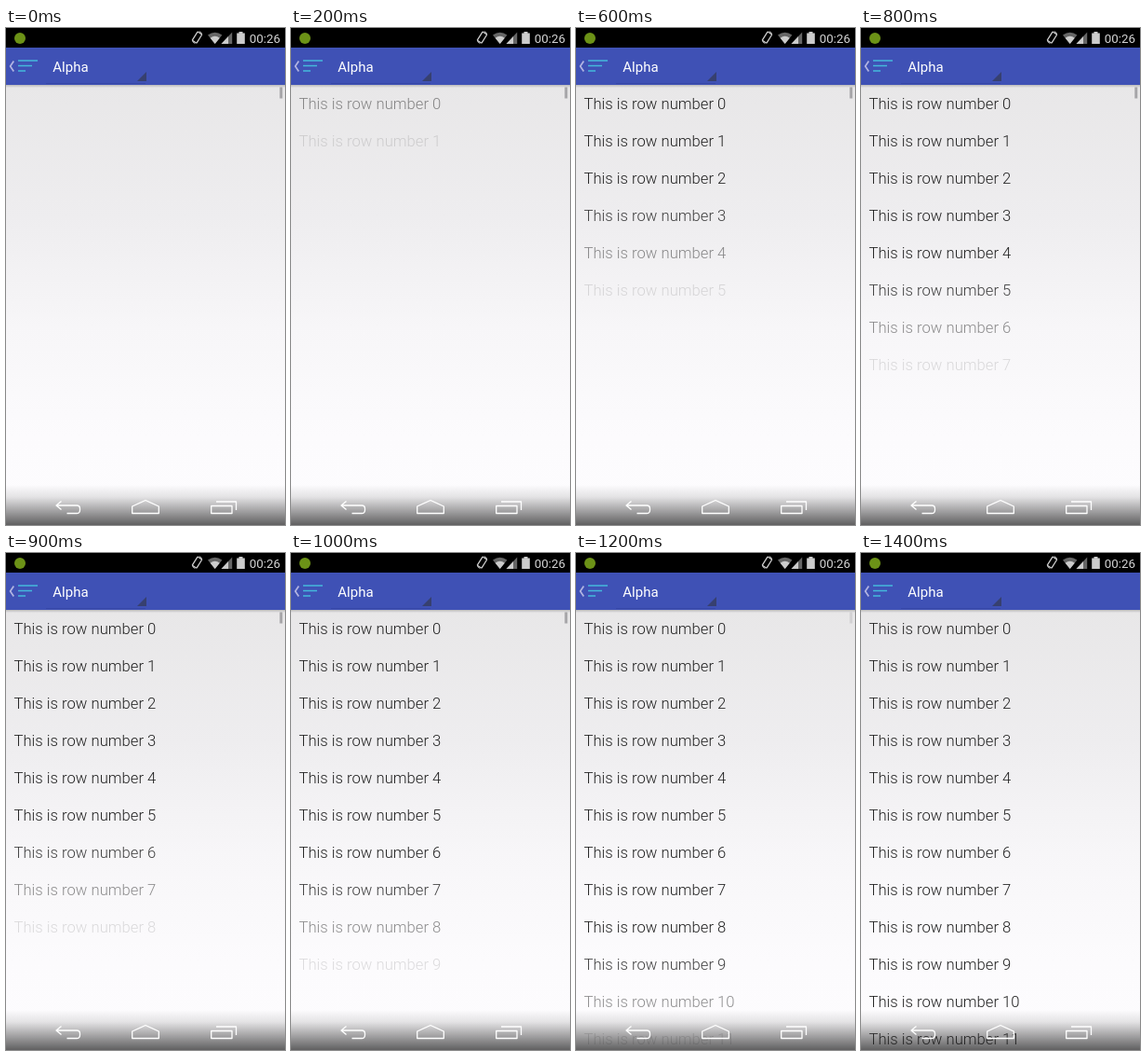
Write an HTML page that moves like this. It is 300 by 533 pixels and loops after 1.5 s.

```html
<!DOCTYPE html>
<html lang="en">
<head>
<meta charset="utf-8">
<title>Row list fade-in</title>
<style>
  html, body { margin: 0; width: 100%; height: 100%; overflow: hidden; background: #000; }
  svg { display: block; width: 100vw; height: 100vh; }
  text { font-family: Roboto, sans-serif; }
  .row { font-size: 16.67px; font-weight: 300; fill: #222; }
  .line { fill: none; stroke: #fff; stroke-width: 1.3; stroke-linejoin: round; }
</style>
</head>
<body>
<svg viewBox="0 0 300 533" preserveAspectRatio="none">
  <defs>
    <linearGradient id="page" x1="0" y1="0" x2="0" y2="1">
      <stop offset="0" stop-color="#e8e7e8"/>
      <stop offset=".3" stop-color="#eeedef"/>
      <stop offset=".55" stop-color="#f7f6f8"/>
      <stop offset=".8" stop-color="#fcfbfd"/>
      <stop offset="1" stop-color="#fdfcfe"/>
    </linearGradient>
    <linearGradient id="shade" x1="0" y1="0" x2="0" y2="1">
      <stop offset="0" stop-color="#000" stop-opacity="0"/>
      <stop offset=".3" stop-color="#000" stop-opacity=".1"/>
      <stop offset="1" stop-color="#000" stop-opacity=".62"/>
    </linearGradient>
    <linearGradient id="drop" x1="0" y1="0" x2="0" y2="1">
      <stop offset="0" stop-color="#000" stop-opacity=".2"/>
      <stop offset="1" stop-color="#000" stop-opacity="0"/>
    </linearGradient>
  </defs>

  <rect y="61" width="300" height="472" fill="url(#page)"/>
  <g id="rows"></g>
  <rect id="thumb" x="294.3" y="63.5" width="3" height="12" fill="#a6a5a8"/>

  <!-- action bar -->
  <rect y="21" width="300" height="40" fill="#3f51b5"/>
  <rect y="61" width="300" height="3" fill="url(#drop)"/>
  <path d="M8.3 35.5L4.6 41l3.7 5.5" fill="none" stroke="#b3b5e2" stroke-width="1.7"/>
  <path d="M13 35h21M13 40.5h15M13 46h8" stroke="#45b9dc" stroke-width="1.6"/>
  <path d="M43 59.5h107" stroke="#3848a4" stroke-width=".8"/>
  <path d="M151 47v10h-10z" fill="#37406f"/>
  <text x="50.3" y="46.5" font-size="15" fill="#fff">Alpha</text>

  <!-- status bar -->
  <rect width="300" height="21" fill="#000"/>
  <circle cx="15" cy="11" r="6" fill="#6c9217"/>
  <g fill="none" stroke="#ccc" stroke-width="1.3">
    <rect x="202.7" y="4.6" width="5.6" height="11" rx="1" transform="rotate(32 205.5 10.1)"/>
    <path d="M200.3 12.5q.2 3.3 3 4M207.8 3.6q2.6.8 2.9 3.8" stroke-width="1"/>
  </g>
  <path d="M217 7.5Q224.7 1.8 232.4 7.5L224.7 17z" fill="#666"/>
  <path d="M219.6 10.7Q224.7 7 229.8 10.7L224.7 17z" fill="#ccc"/>
  <path d="M243.2 4.5V17H231.5z" fill="#666"/>
  <path d="M239 9V17H231.5z" fill="#ccc"/>
  <path d="M250.5 4h4v1.5h2.3V17h-8.6V5.5h2.3z" fill="#ccc"/>
  <text x="261.7" y="15.9" font-size="13.33" fill="#d4d4d4">00:26</text>

  <!-- navigation bar -->
  <rect y="490" width="300" height="43" fill="url(#shade)"/>
  <path class="line" d="M59.5 507.5L54 512l5.500 4.500M54 512H76q3.500 0 3.500 3.500v1.500q0 3.500-3.500 3.500H65.500"/>
  <path class="line" d="M135.700 520.500v-7.500L150 506.500l14.300 6.500v7.500z"/>
  <path class="line" d="M220.700 512.500h22.300v8h-22.300zM226 508h21.500v9"/>
</svg>
<script>
  const LOOP = 1500, STEP = 100, FADE = 400, COUNT = 12;
  const NS = 'http://www.w3.org/2000/svg';
  const list = document.getElementById('rows');
  const thumb = document.getElementById('thumb');
  const clamp = v => Math.max(0, Math.min(1, v));
  const ease = p => (1 - Math.cos(Math.PI * clamp(p))) / 2;

  const rows = Array.from({ length: COUNT }, (_, i) => {
    const el = document.createElementNS(NS, 'text');
    el.setAttribute('class', 'row');
    el.setAttribute('x', 8.5);
    el.setAttribute('y', 87 + 40 * i);
    el.textContent = 'This is row number ' + i;
    return list.appendChild(el);
  });

  // The picture advances in steps of 100 ms.
  function draw(now) {
    const t = Math.floor((now % LOOP) / STEP) * STEP;
    rows.forEach((el, i) => el.setAttribute('opacity', ease((t - i * STEP) / FADE)));
    thumb.setAttribute('opacity', clamp((1300 - t) / 300));
  }

  let start;
  function tick(now) {
    if (start === undefined) start = now;
    draw(now - start);
    requestAnimationFrame(tick);
  }
  draw(0);
  requestAnimationFrame(tick);
</script>
</body>
</html>
```
